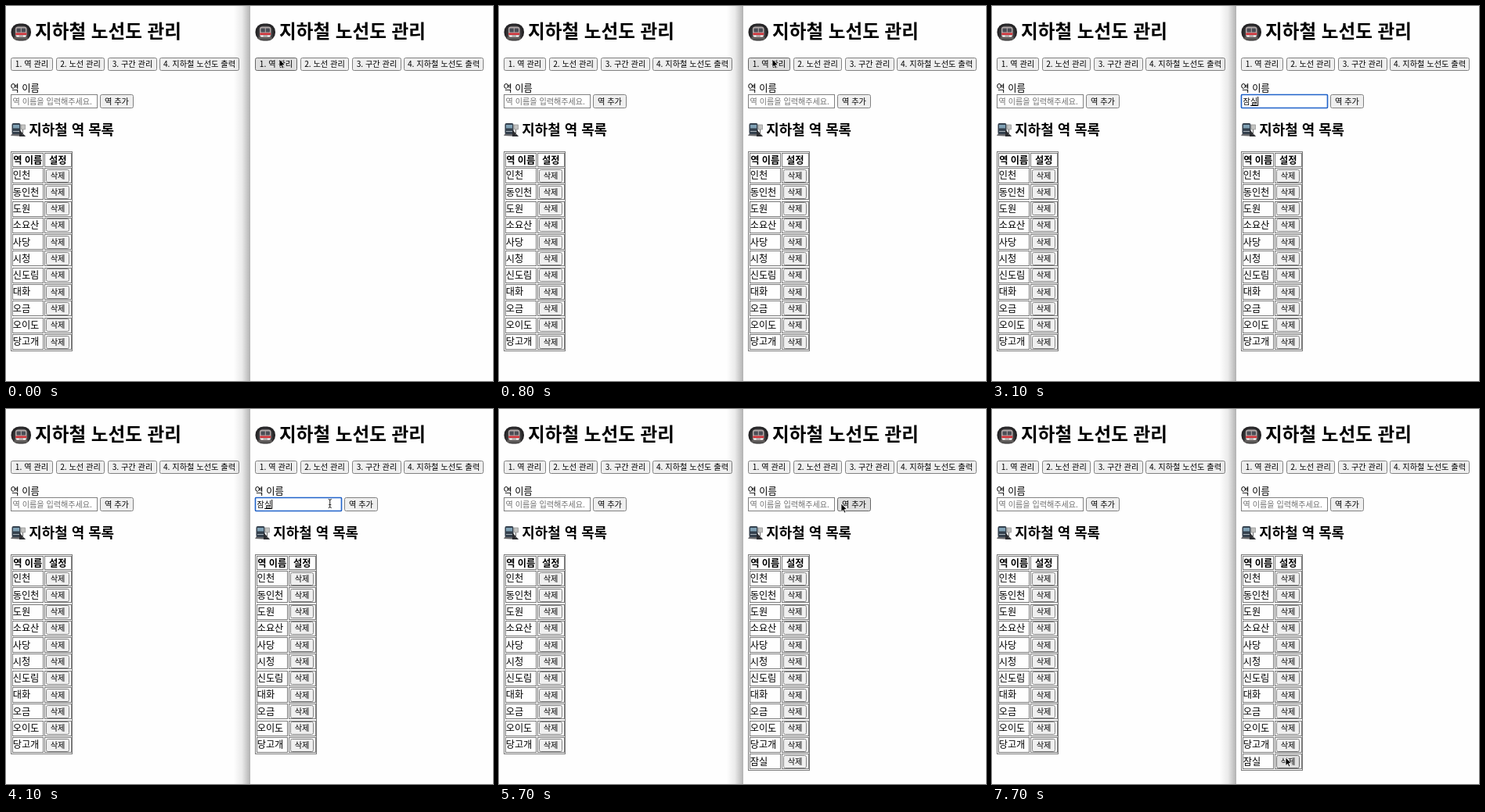
Write an HTML page that moves like this. It is 622 px wide and 480 px high and loops after 8 s.

```html
<!DOCTYPE html>
<html lang="ko">
<head>
<meta charset="utf-8">
<style>
html, body { margin: 0; width: 622px; height: 480px; overflow: hidden; background: #fefefe; }
svg { display: block; }
text { font-family: "Noto Sans CJK KR", "Noto Sans CJK", "Noto Sans KR", sans-serif; font-weight: 500; white-space: pre; }
.bold { font-weight: 700; }
.mid { text-anchor: middle; }
.line { fill: none; stroke: #7a7a7a; }
.btn { fill: #efefef; stroke: #808080; }
.btn.hover { fill: #dfdfdf; stroke: #666; }
</style>
</head>
<body>
<svg id="stage" width="622" height="480" viewBox="0 0 622 480">
  <defs>
    <linearGradient id="shade">
      <stop offset="0" stop-opacity="0"/>
      <stop offset=".5" stop-opacity=".08"/>
      <stop offset="1" stop-opacity=".3"/>
    </linearGradient>
    <g id="metro">
      <rect x="6.5" y="22.5" width="25.5" height="22" rx="10.5" fill="#262527"/>
      <path d="M9.5 40V33a9.7 8.5 0 0 1 19.400 0v7z" fill="#39383a"/>
      <path d="M9 41.500l3-2.500h14l3 2.500-3 2H12z" fill="#5d5a59"/>
      <rect x="12" y="26.500" width="14.500" height="13.500" rx="3" fill="#b3a9a9"/>
      <rect x="13.500" y="28.500" width="11.500" height="5" rx="1" fill="#4b4d55"/>
      <path d="M19.300 28v6" stroke="#b3a9a9"/>
      <rect x="12.300" y="34.500" width="13.900" height="2.500" fill="#d2343b"/>
      <path d="M13.500 38.500h3m5.500 0h3" stroke="#fff" stroke-width="1.300"/>
    </g>
    <g id="station">
      <path d="M6 166l2-3h11l6 4z" fill="#6a6a6d"/>
      <rect x="7.500" y="150" width="11" height="14" rx="2" fill="#34404d"/>
      <rect x="9" y="152" width="8" height="4.500" fill="#7fa0b4"/>
      <path d="M9 160.500h8" stroke="#aab3ba"/>
      <path d="M17 158l8 9h-8z" fill="#2b2c30"/>
      <path d="M21.500 152v13" stroke="#666"/>
      <rect x="19" y="152" width="5.500" height="6" fill="#c4c4c2" stroke="#7d7d7d" stroke-width=".6"/>
    </g>
  </defs>
</svg>
<script>
const LOOP = 8000, SHIFT = 312;
const stations = ["인천", "동인천", "도원", "소요산", "사당", "시청", "신도림", "대화", "오금", "오이도", "당고개", "잠실"];
const menu = [[6, 54, "1. 역 관리"], [64, 62, "2. 노선 관리"], [130, 63, "3. 구간 관리"], [196, 102, "4. 지하철 노선도 출력"]];
const typing = [[2200, "ㅈ"], [2400, "자"], [2500, "잠"], [2800, "잠ㅅ"], [2900, "잠시"], [3000, "잠실"], [4500, ""]];
// Pointer stops: time, x, y
const path = [[0, 349, 68], [1500, 349, 68], [2000, 353, 117], [3500, 353, 117], [4000, 406, 121], [4400, 437, 121],
  [5900, 437, 121], [6200, 408, 265], [6400, 383, 371], [6800, 375, 445], [6900, 375, 445], [7000, 375, 446], [LOOP, 375, 446]];

const stage = document.getElementById("stage");
const $ = id => document.getElementById(id);

const text = (x, middle, size, str, attrs = "") =>
  `<text x="${x}" y="${(middle + size * .38).toFixed(1)}" font-size="${size}" ${attrs}>${str}</text>`;
const box = (x, y, w, h, attrs = 'class="line"') =>
  `<rect x="${x + .5}" y="${Math.round(y) + .5}" width="${w - 1}" height="${h - 1}" ${attrs}/>`;
const button = (x, y, w, h, label) => box(x, y, w, h, 'class="btn" rx="2"') +
  text(x + w / 2, Math.round(y) + h / 2 - .3, 10.2, label, 'class="mid"');

function row(name, i) {
  const y = 206.9 + 21.3 * i;
  return box(8, y, 40, 20) + box(49, y, 35, 20) + text(8.7, y + 9.8, 12.2, name) + button(51, y + 1.6, 30, 17, "삭제");
}

const header = `<use href="#metro"/>${text(37, 32.3, 23.6, "지하철 노선도 관리", 'class="bold"')}` +
  menu.map(([x, w, label]) => button(x, 66, w, 17, label)).join("");

const content = side => text(5.6, 105.3, 12.2, "역 이름") +
  box(6, 113, 111, 18, 'fill="#fff" stroke="#808080"') +
  text(8.6, 121.8, 10.1, "역 이름을 입력해주세요.", `id="hint${side}" fill="#707070"`) +
  button(120, 113, 43, 18, "역 추가") +
  `<use href="#station"/>${text(29.3, 158.2, 17.9, "지하철 역 목록", 'class="bold"')}` +
  box(6, 186, 79, 256, `class="line" id="table${side}"`) +
  box(8, 188, 40, 18) + box(49, 188, 35, 18) +
  text(27.7, 197.1, 12.2, "역 이름", 'class="bold mid"') +
  text(66.2, 197.1, 12.2, "설정", 'class="bold mid"') +
  stations.slice(0, 11).map(row).join("");

stage.insertAdjacentHTML("beforeend", `
  ${header}${content("L")}
  <rect x="291" width="21" height="480" fill="url(#shade)"/>
  <g id="right" transform="translate(${SHIFT})">
    ${header}
    <g id="content">${content("R")}
      <g id="added">${row(stations[11], 11)}</g>
      <rect id="ring" x="6.5" y="113.5" width="110" height="17" rx="1" fill="none" stroke="#1f62c9" stroke-width="1.6"/>
      ${text(8.6, 121.8, 10.1, "", 'id="value"')}
      <path id="compose" stroke="#000" fill="none"/>
    </g>
  </g>
  <path id="arrow" d="M0 0V10.5L2.5 8.3 4.1 12 5.900 11.2 4.3 7.6H7.6Z" stroke="#fff" stroke-width=".8"/>
  <path id="beam" d="M-2 -5.5Q0 -5.5 0 -4Q0 -5.5 2 -5.5M0 -4V4M-2 5.5Q0 5.5 0 4Q0 5.5 2 5.5M-1.5 1.5H1.5" fill="none" stroke="#222"/>`);

const buttons = [...$("right").querySelectorAll(".btn")].map(el =>
  ({ el, x: el.x.baseVal.value + SHIFT, y: el.y.baseVal.value, w: el.width.baseVal.value, h: el.height.baseVal.value }));
const inside = (x, y, b) => x >= b.x && x <= b.x + b.w && y >= b.y && y <= b.y + b.h;
const inputBox = { x: 318, y: 113, w: 111, h: 18 };
const show = (id, on) => $(id).setAttribute("visibility", on ? "inherit" : "hidden");

function pointer(t) {
  const i = path.findIndex(p => p[0] > t);
  const [t0, x0, y0] = path[i - 1], [t1, x1, y1] = path[i];
  const k = (t - t0) / (t1 - t0);
  return [x0 + (x1 - x0) * k, y0 + (y1 - y0) * k];
}

function draw(now) {
  const t = Math.floor(now % LOOP / 100) * 100;
  const [x, y] = pointer(t);
  const hidden = t >= 2200 && t < 3600;
  const overInput = t >= 100 && inside(x, y, inputBox);
  const focus = t >= 2000 && t < 4400;
  const value = (typing.filter(k => k[0] <= t).pop() || [0, ""])[1];
  const end = 8.6 + value.length * 9.3;

  show("content", t >= 100);
  show("added", t >= 4500);
  $("tableR").setAttribute("height", t >= 4500 ? 276 : 255);
  show("ring", focus);
  show("hintR", !value);
  $("value").textContent = value;
  $("compose").setAttribute("d", `M${end - 9} 127.5H${end}M${end + .5} 116V128`);
  show("compose", focus && value);
  show("arrow", !hidden && !overInput);
  show("beam", !hidden && overInput);
  for (const id of ["arrow", "beam"]) $(id).setAttribute("transform", `translate(${x} ${y})`);
  for (const b of buttons) b.el.classList.toggle("hover", !hidden && inside(x, y, b));
}

const start = performance.now();
function tick() {
  draw(performance.now() - start);
  requestAnimationFrame(tick);
}
tick();
</script>
</body>
</html>
```
